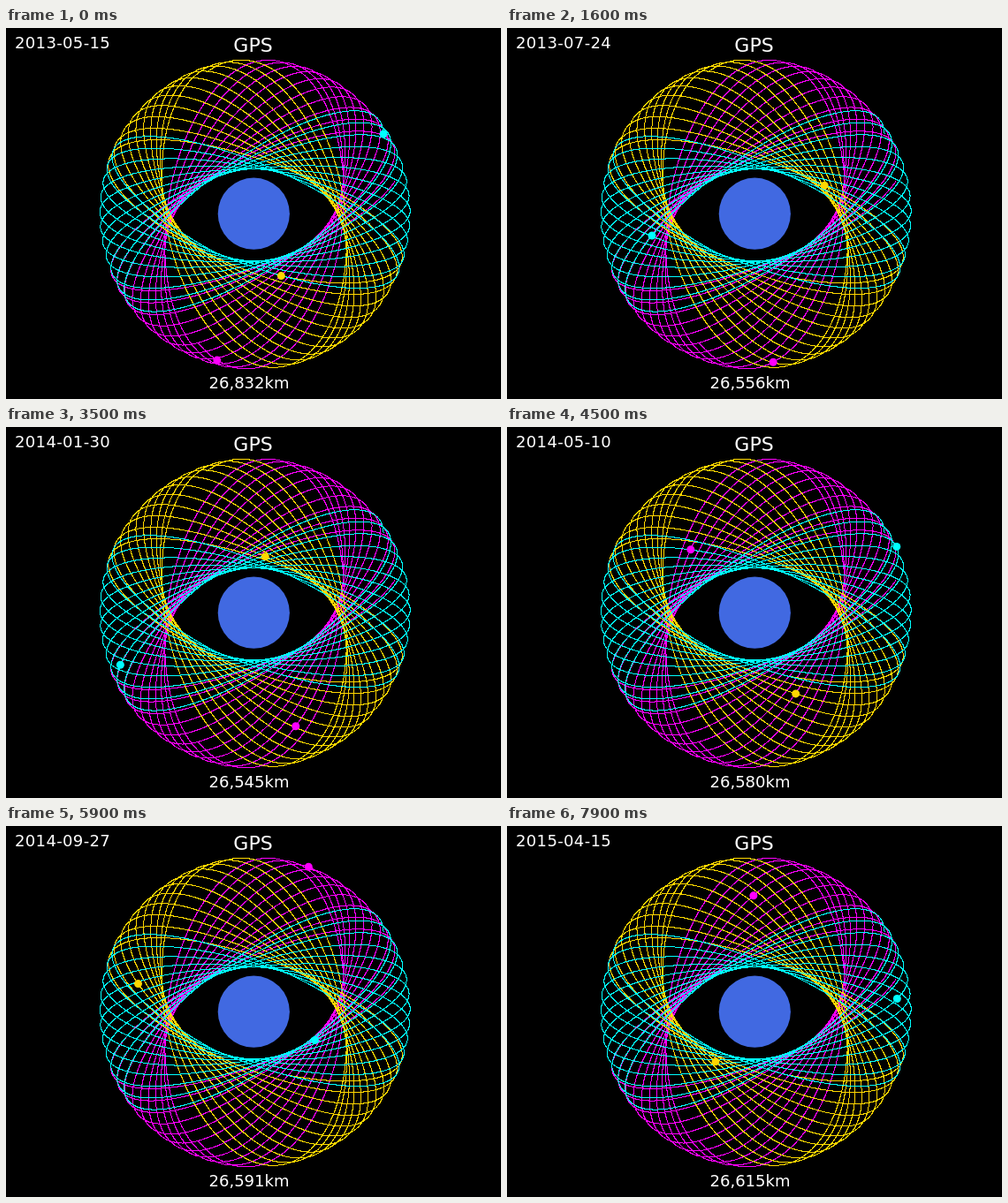
An HTML page with a canvas that plays this animation: 560x420 px, repeating every 8 s.

```html
<!DOCTYPE html>
<html lang="en">
<head>
<meta charset="utf-8">
<title>Satellite orbits</title>
<style>
  html, body { margin: 0; width: 100%; height: 100%; overflow: hidden; background: #000; }
  canvas { display: block; }
</style>
</head>
<body>
<canvas id="stage" width="560" height="420"></canvas>
<script>
const W = 560, H = 420, CX = 280.6, CY = 210.8;
const SCALE = 175.5, AXIS = 26560;    // px and km of the mean orbit radius
const LOOP = 8000, HOLD = 1000, TICK = 100;
const TRAIL_STEPS = 190;              // one step is ten days
const RAD = Math.PI / 180;
const TILT = 17.3 * RAD;              // pole of the equator against the line of sight
const FONT = '"DejaVu Sans", Verdana, sans-serif';

const lerp = (a, b, k) => a + (b - a) * k;
const drift = s => Math.max(0, 1 - s / 4.5);

// Radial swing of the measured satellite, km by step
const SWING = [[0, 0], [7, 4.31], [26, 15.13], [36, 23.72], [50, 40.77], [60, 44.63], [70, 55.76], [190, 90]];
function swing(s) {
  const i = Math.max(1, SWING.findIndex(p => p[0] >= s));
  const [s0, a] = SWING[i - 1], [s1, b] = SWING[i];
  return lerp(a, b, (s - s0) / (s1 - s0));
}

// incl: inclination, az: azimuth of the orbit normal, azRate: its regression per step
const sats = [
  {
    color: '#ff00ff', incl: 55, az: 190.4, azRate: 0.4,
    angle: s => 215 + 20.498 * s + 103.8 * drift(s),
    radius: (s, a) => AXIS + swing(s) * Math.cos((a - 200) * RAD) + 272 * drift(s)
  },
  {
    color: '#ffd700', incl: 53.5, az: 70, azRate: 0.4,
    angle: s => 112.7 + 20.461 * s,
    radius: () => AXIS
  },
  {
    // slightly eccentric, perigee at 290 degrees
    color: '#00ffff', incl: 55.5, az: 133.5, azRate: 0.39,
    angle: s => {
      const m = 153.4 + 20.525 * s;
      return m + 2.06 * Math.sin((m - 290) * RAD);
    },
    radius: (s, a) => AXIS * (1 - 0.018 * Math.cos((a - 290) * RAD))
  }
];

function place(sat, s) {
  const deg = sat.angle(s), a = deg * RAD;
  const f = (sat.az - sat.azRate * s) * RAD, i = sat.incl * RAD;
  const km = sat.radius(s, deg), r = km / AXIS * SCALE;
  const u = Math.cos(a), v = Math.sin(a);
  // equatorial coordinates, then tilted toward the viewer
  const x = -u * Math.sin(f) - v * Math.cos(i) * Math.cos(f);
  const q = u * Math.cos(f) - v * Math.cos(i) * Math.sin(f);
  const p = v * Math.sin(i);
  const y = q * Math.cos(TILT) + p * Math.sin(TILT);
  return { x: CX + r * x, y: CY - r * y, km };
}

// Hard-edged line whose stair steps share an edge
function pixelLine(g, a, b) {
  const n = Math.max(1, Math.ceil(2 * (Math.abs(b.x - a.x) + Math.abs(b.y - a.y))));
  for (let k = 0; k < n; k++) {
    g.fillRect(Math.floor(lerp(a.x, b.x, k / n)), Math.floor(lerp(a.y, b.y, k / n)), 1, 1);
  }
}

function disc(g, x, y, r, color) {
  g.fillStyle = color;
  g.beginPath();
  g.arc(x, y, r, 0, 2 * Math.PI);
  g.fill();
}

function label(g, text, x, y, size, align, spacing = 0) {
  g.font = size + 'px ' + FONT;
  g.textAlign = align;
  g.letterSpacing = spacing + 'px';
  g.fillStyle = '#fff';
  g.fillText(text, x, y);
}

function makeBackdrop() {
  const c = document.createElement('canvas');
  c.width = W;
  c.height = H;
  const g = c.getContext('2d');
  g.fillStyle = '#000';
  g.fillRect(0, 0, W, H);
  for (const sat of sats) {
    g.fillStyle = sat.color;
    let last = place(sat, 0);
    for (let k = 1; k <= TRAIL_STEPS * 10; k++) {
      const next = place(sat, k / 10);
      pixelLine(g, last, next);
      last = next;
    }
  }
  disc(g, 280.3, 210.2, 40.6, '#4169e1');
  label(g, 'GPS', 279.5, 27, 22, 'center');
  return c;
}

const ctx = document.getElementById('stage').getContext('2d');
const backdrop = makeBackdrop();

function draw(t) {
  const s = t < HOLD ? 0 : Math.floor((t - HOLD) / TICK) + 1;
  const date = new Date(Date.UTC(2013, 4, 15 + 10 * s)).toISOString().slice(0, 10);
  const spots = sats.map(sat => place(sat, s));
  const km = Math.round(spots[0].km).toLocaleString('en-US') + 'km';

  ctx.drawImage(backdrop, 0, 0);
  spots.forEach((p, i) => disc(ctx, p.x, p.y, 4.5, sats[i].color));
  label(ctx, date, 10, 23, 18, 'left', 0.35);
  label(ctx, km, 275, 408, 18, 'center');
}

function loop() {
  draw(performance.now() % LOOP);
  requestAnimationFrame(loop);
}
loop();
</script>
</body>
</html>
```
